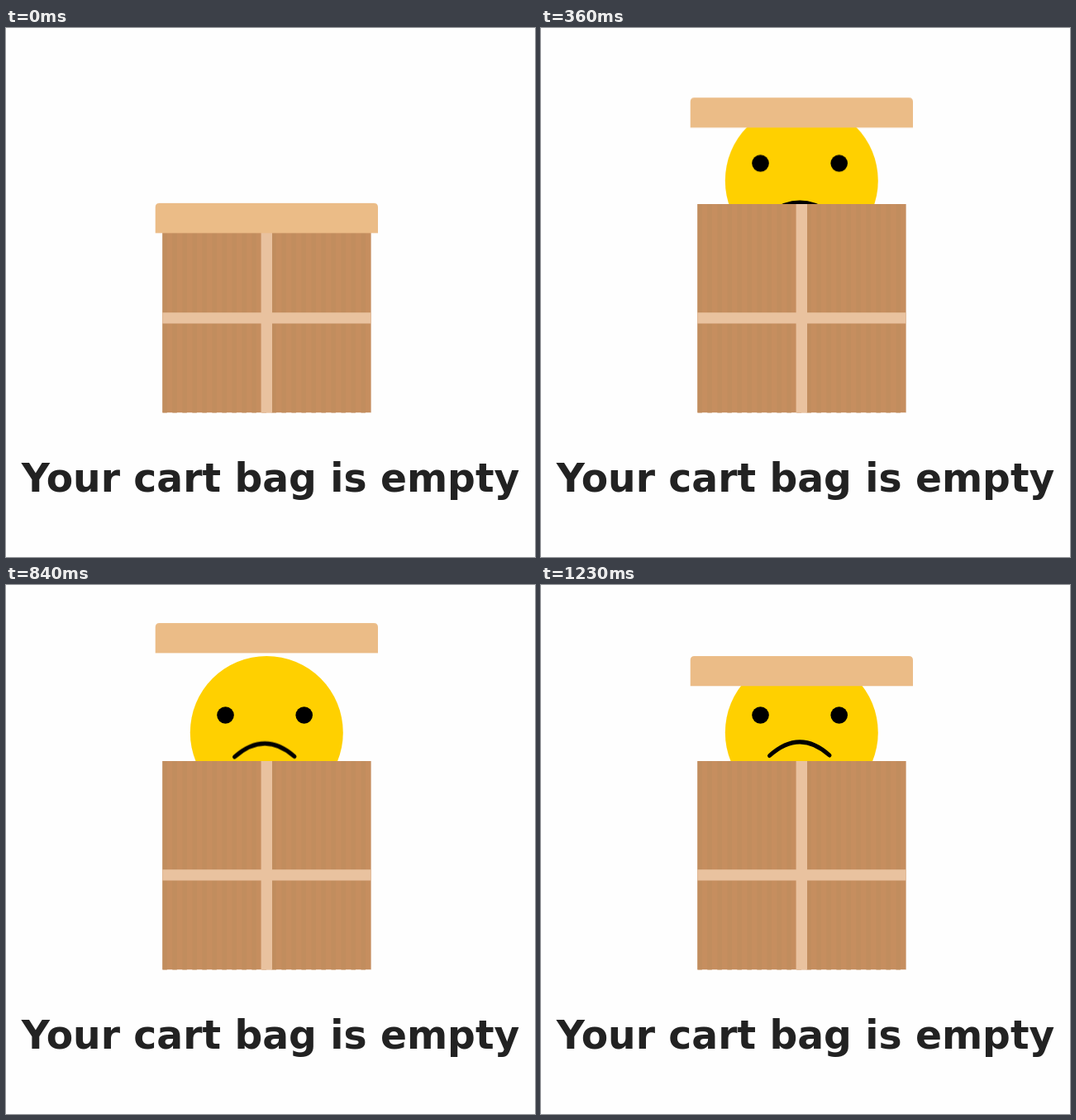
Write an HTML page that moves like this. It is 640x640 px and loops after 1530 ms.

```html
<!DOCTYPE html>
<html lang="en">
<head>
<meta charset="utf-8">
<title>Empty cart</title>
<style>
  html, body { margin: 0; width: 100%; height: 100%; overflow: hidden; background: #fefefe; }
  svg { display: block; width: 100%; height: 100%; }
  text { font: bold 47.2px "DejaVu Sans", sans-serif; fill: #222; text-anchor: middle; }

  .lid, .face, .eyes, .mouth { animation: 1530ms linear infinite; }
  .lid { animation-name: lift; fill: #ebbc87; }
  .face { animation-name: rise; }
  .eyes { animation-name: blink; }
  .mouth {
    animation-name: frown;
    transform-origin: 313px 254px;
    fill: none;
    stroke: #000;
    stroke-width: 5;
    stroke-linecap: round;
    vector-effect: non-scaling-stroke;
  }

  @keyframes lift {
    0% { transform: translateY(0); animation-timing-function: cubic-bezier(.306, .2, .145, 1); }
    56.86% { transform: translateY(-166px); animation-timing-function: ease-in-out; }
    67.97%, 100% { transform: translateY(-126px); }
  }
  @keyframes rise {
    0% { transform: translateY(180px); animation-timing-function: cubic-bezier(.2, .1, .6, 1); }
    27.45%, 100% { transform: translateY(0); }
  }
  @keyframes blink {
    0%, 62.75% { opacity: 1; }
    70.59% { opacity: .1; }
    79.41%, 100% { opacity: 1; }
  }
  @keyframes frown {
    0% { transform: scaleY(.3); animation-timing-function: cubic-bezier(.215, .61, .355, 1); }
    80.39%, 100% { transform: scaleY(1); }
  }
</style>
</head>
<body>
<svg viewBox="0 0 640 640">
  <defs>
    <pattern id="ribs" x="189.3" y="213" width="12.01" height="253" patternUnits="userSpaceOnUse">
      <rect width="5.5" height="253" fill="#c18d5e"/>
    </pattern>
  </defs>

  <g class="face">
    <circle cx="315.3" cy="178.5" r="92.5" fill="#ffd000"/>
    <g class="eyes">
      <circle cx="265.5" cy="157.5" r="10.3"/>
      <circle cx="360.7" cy="157.5" r="10.3"/>
    </g>
    <path class="mouth" d="M276.5 206.5Q313 173.5 349 206"/>
  </g>

  <path d="M189.3 213H441.5V465.3H189.3Z" fill="#c68e5f"/>
  <path d="M189.3 213H441.5V465.6H189.3Z" fill="url(#ribs)"/>
  <path d="M308.6 213H322V344.2H441.5V357.5H322V465.5H308.6V357.5H189.3V344.2H308.6Z" fill="#e9c29f"/>

  <path class="lid" d="M180.7 248.2V217Q180.7 212 185.7 212H445Q450 212 450 217V248.2Z"/>

  <text x="320" y="561">Your cart bag is empty</text>
</svg>
</body>
</html>
```
